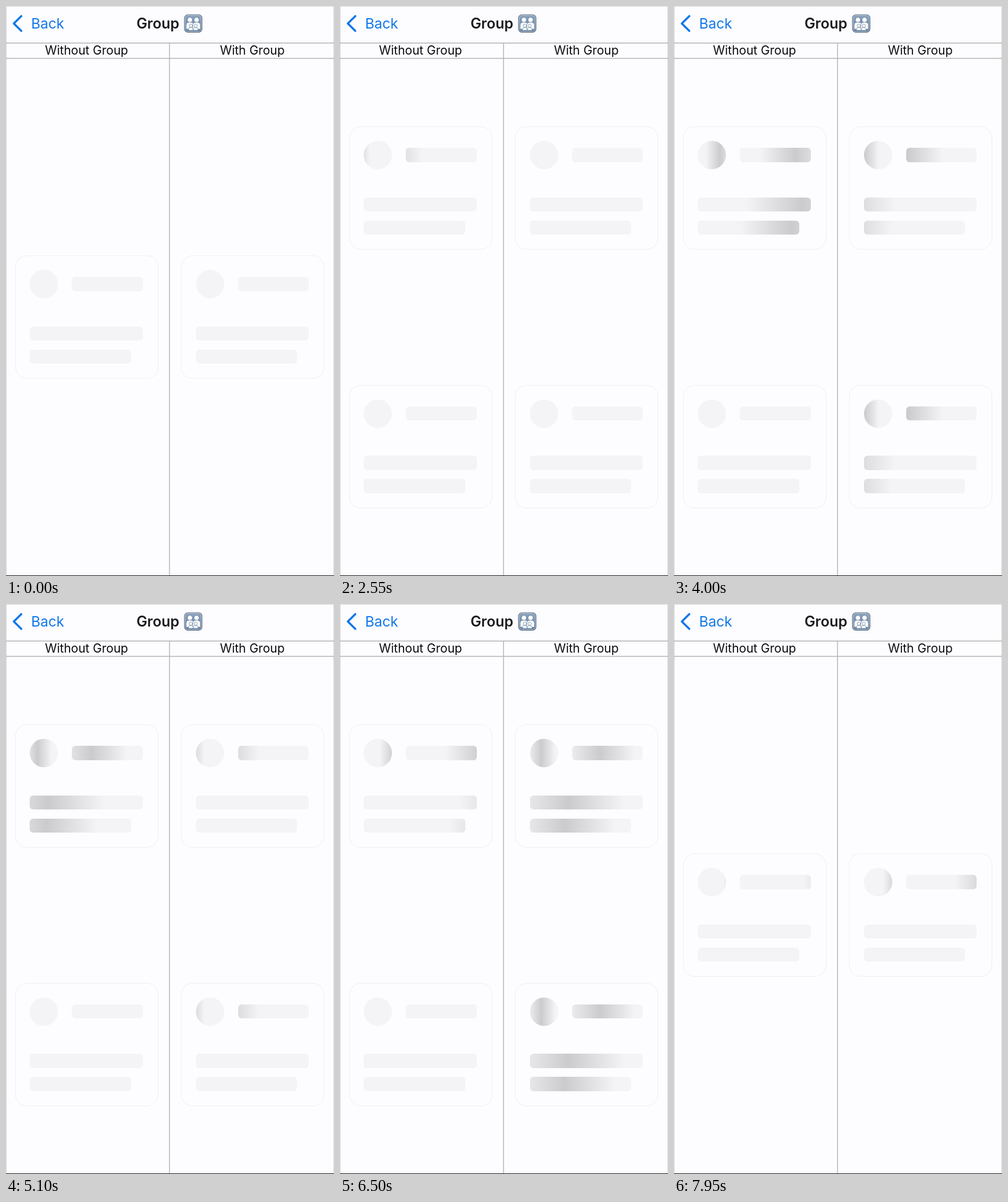
Recreate the animation shown at these times as an HTML page. Size 568 px wide and 985 px high, loop 8 s.

```html
<!DOCTYPE html>
<html lang="en">
<head>
<meta charset="utf-8">
<title>Skeleton group</title>
<style>
  html, body { margin: 0; width: 100%; height: 100%; overflow: hidden; background: #fdfcff; }
  svg { position: absolute; left: 0; top: 0; }
  text { font-family: Inter, "Liberation Sans", sans-serif; text-anchor: middle; }
  .card {
    position: absolute; box-sizing: border-box; width: 248px; height: 213px;
    border: 1.5px solid #eef0f3; border-radius: 20px;
  }
  .bone {
    position: absolute; border-radius: 6px;
    background: #f4f3f6 linear-gradient(90deg, #f4f3f6, #cbcacd, #f4f3f6) no-repeat;
  }
</style>
</head>
<body>
<svg width="568" height="985">
  <defs>
    <linearGradient id="tile" x2="0" y2="1">
      <stop stop-color="#8ea4bd"/><stop offset="1" stop-color="#5f7b9b"/>
    </linearGradient>
    <g id="adult"><circle cx="318.500" cy="24" r="4.300"/><path d="M312 40v-7q0-5 6.500-5t6.500 5v7z"/></g>
    <g id="child"><circle cx="320" cy="34" r="2.800"/><path d="M316 42v-2q0-3 4-3t4 3v2z"/></g>
  </defs>
  <path d="M.5 985V.5h567V985" fill="none" stroke="#d6d5d8"/>
  <path d="M0 64h568M0 90.500h568M283.200 64v920" fill="none" stroke="#b2b1b4" stroke-width="1.400"/>
  <path d="M0 984.500h568" stroke="#111"/>
  <path d="M26.500 17.500L13.500 30.200l13 12.800" fill="none" stroke="#1278e8" stroke-width="3.600" stroke-linecap="round" stroke-linejoin="round"/>
  <text x="72" y="39" font-size="24.500" fill="#1278e8">Back</text>
  <text x="263" y="39" font-size="25" font-weight="600" fill="#1c1b1e">Group</text>
  <text x="139.500" y="84" font-size="21" fill="#0c0b0e">Without Group</text>
  <text x="426.500" y="84" font-size="21" fill="#0c0b0e">With Group</text>
  <rect x="308.500" y="14.500" width="31.500" height="31.500" rx="6.500" fill="#5d7389"/>
  <rect x="310.200" y="16" width="28" height="28" rx="5" fill="url(#tile)" stroke="#c3cfdb"/>
  <g fill="#fff" stroke="#6f89a5" stroke-width=".8">
    <use href="#adult"/><use href="#adult" x="11.500"/>
    <use href="#child"/><use href="#child" x="8.500"/>
  </g>
</svg>
<script>
const LOOP = 8000, PERIOD = 1172, RAMP = 300;
const ADD = 1750, REMOVE = 7600;

// left, top, width, height, travel, radius
const BONES = [
  [26, 25.5, 49, 49, 1, 25],
  [99, 37.5, 122.5, 24.5, 1, 6],
  [26, 123, 195.5, 24.5, 1.5, 6],
  [26, 163, 175.5, 24.5, 1.5, 6]
];

// Sweep of the highlight: phase in ms, offset in bone widths
const SWEEP = [[-300, -1], [-222, -.78], [-145, -.47], [-16, -.23], [0, -.17],
  [56, .28], [212, .56], [290, .7], [490, .9], [545, 1]];

function sweep(phase) {
  if (phase <= SWEEP[0][0]) return -1;
  for (let i = 1; i < SWEEP.length; i++) {
    const [p0, s0] = SWEEP[i - 1], [p1, s1] = SWEEP[i];
    if (phase < p1) return s0 + (s1 - s0) * (phase - p0) / (p1 - p0);
  }
  return 1;
}

const cycle = (t, start) => ((t - start) % PERIOD + PERIOD) % PERIOD - RAMP;
const single = (t, start) => (t - start) * 1.2 - RAMP;

const alone = t => cycle(t, 128);
const late = t => t < 2600 ? -RAMP : cycle(t, 688);
function grouped(t) {
  if (t < 1350) return single(t, 150);
  if (t > 5021 && t < 6425) return single(t, 5021);
  return cycle(t, 333);
}

function makeCard(x, phase, second) {
  const el = document.createElement("div");
  el.className = "card";
  el.style.left = x + "px";
  const bones = BONES.map(([left, top, width, height, travel, radius]) => {
    const bone = document.createElement("div");
    bone.className = "bone";
    const px = { left: left - 1.5, top: top - 1.5, width, height, borderRadius: radius };
    for (const key in px) bone.style[key] = px[key] + "px";
    el.append(bone);
    return { style: bone.style, span: width * travel };
  });
  document.body.append(el);
  return { el, bones, phase, second };
}

const cards = [
  makeCard(15.5, alone, false), makeCard(303, grouped, false),
  makeCard(15.5, late, true), makeCard(303, grouped, true)
];

function draw(t) {
  const pair = t >= ADD && t < REMOVE;
  for (const { el, bones, phase, second } of cards) {
    el.style.display = second && !pair ? "none" : "block";
    el.style.top = (!pair ? 431 : second ? 654.5 : 208) + "px";
    const offset = sweep(phase(t));
    for (const { style, span } of bones) style.backgroundPosition = offset * span + "px 0";
  }
}

const begin = performance.now();
function tick() {
  draw((performance.now() - begin) % LOOP);
  requestAnimationFrame(tick);
}
tick();
</script>
</body>
</html>
```
